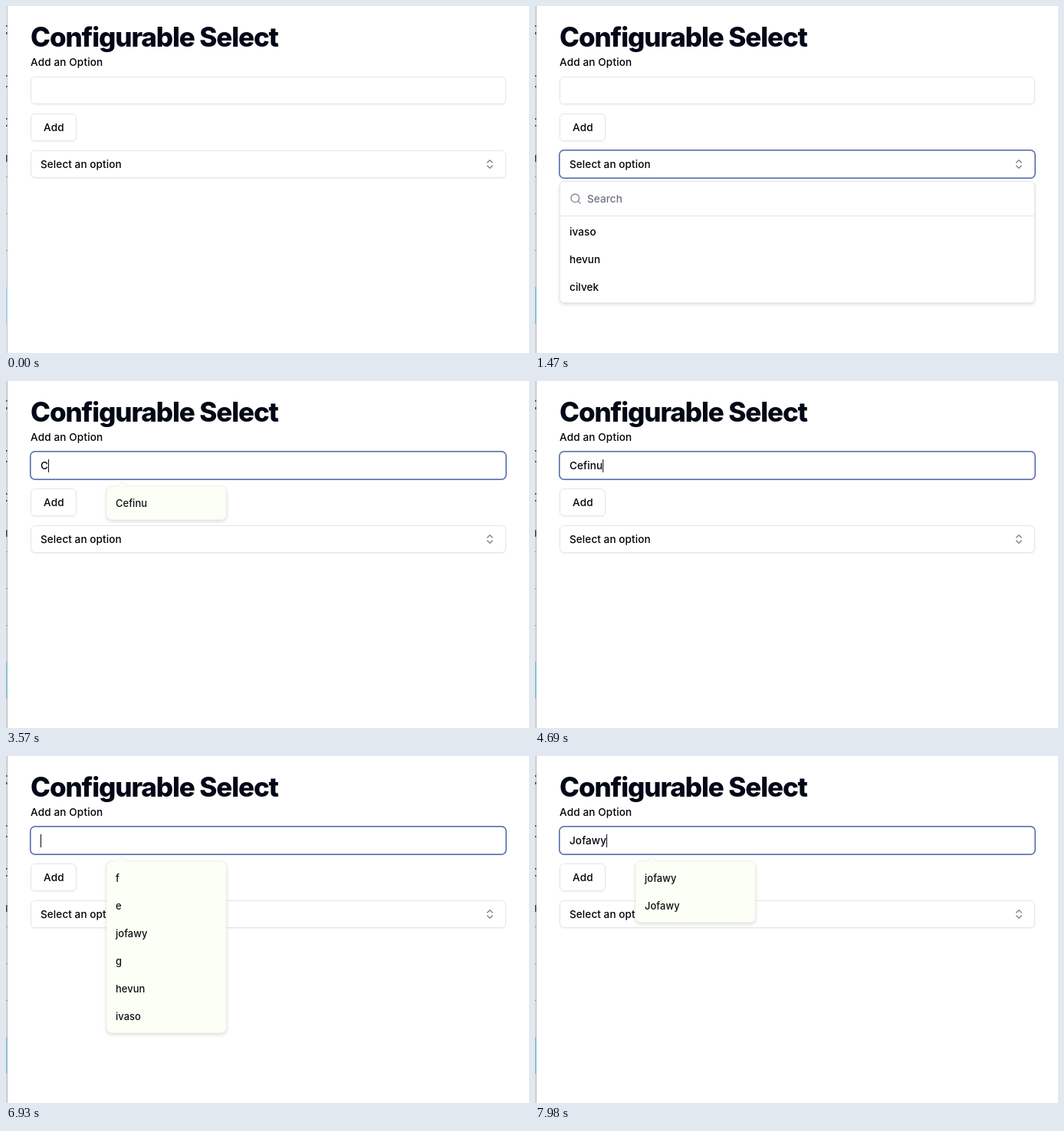
Animation of 682 by 452 pixels, one loop 8000 ms. Source, as an HTML page:

```html
<!DOCTYPE html>
<html lang="en">
<head>
<meta charset="utf-8">
<title>Configurable Select</title>
<style>
  html, body { margin: 0; width: 100%; height: 100%; overflow: hidden; background: #fff; }
  svg { display: block; width: 682px; height: 452px; }
  text { font-family: Inter, "Open Sans", sans-serif; font-size: 13.6px; font-weight: 450; letter-spacing: .05px; fill: #02040a; white-space: pre; }
  .title { font-size: 35px; font-weight: 800; letter-spacing: -1.11px; fill: #020817; }
  .medium { font-weight: 500; letter-spacing: .12px; }
  .hint { fill: #6b7280; }
  .suggest { font-size: 12.9px; font-weight: 500; fill: #0c0f14; }
  .box { fill: #fff; stroke: #e4e6ea; }
  .ring { fill: none; stroke: #536cab; stroke-width: 1.5; }
  .icon { fill: none; stroke: #7f838b; stroke-width: 2; stroke-linecap: round; stroke-linejoin: round; }
  .soft { filter: drop-shadow(0 1px 1px rgba(0, 0, 0, .06)); }
  .raised { filter: drop-shadow(0 2px 2px rgba(0, 0, 0, .13)); }
</style>
</head>
<body>
<svg viewBox="0 0 682 452">
  <rect width="682" height="452" fill="#fff"/>
  <g id="edge"></g>

  <text class="title" x="32" y="53">Configurable Select</text>
  <text class="medium" x="32" y="78">Add an Option</text>

  <rect class="box soft" x="32.5" y="92.5" width="619" height="35" rx="5.5"/>
  <rect class="box soft" x="32.5" y="140.5" width="59" height="35" rx="5.5"/>
  <text class="medium" x="49" y="163">Add</text>
  <rect class="box soft" x="32.5" y="188.5" width="619" height="35" rx="5.5"/>
  <text x="45" y="211">Select an option</text>
  <path class="icon" transform="translate(623 198) scale(.6667)" d="m7 15 5 5 5-5M7 9l5-5 5 5"/>

  <rect id="selectRing" class="ring" x="31.75" y="187.75" width="620.5" height="36.5" rx="6.2"/>
  <rect id="inputRing" class="ring" x="31.75" y="91.75" width="620.5" height="36.5" rx="6.2"/>
  <text id="typed" x="45" y="115.3"></text>
  <rect id="caret" y="102" width="1" height="17" fill="#020817"/>

  <g id="menu">
    <rect class="box raised" x="32.5" y="228.5" width="619" height="158" rx="5.5"/>
    <path d="M33 273.5H651" stroke="#e4e6ea"/>
    <path class="icon" transform="translate(45 243) scale(.6667)" d="M19 11a8 8 0 1 1-16 0a8 8 0 1 1 16 0M21 21l-4.3-4.3"/>
    <text class="hint" x="68" y="256">Search</text>
    <g id="options"></g>
  </g>

  <g id="popover">
    <g class="raised">
      <rect id="panel" x="131" y="137" width="156.5" rx="7" fill="#fcfff5" stroke="#e3e6df" stroke-width=".6"/>
    </g>
    <path d="M144.5 137.4L150.6 131.4Q152 130.2 153.4 131.4L159.5 137.4" fill="#fcfdfa" stroke="#e6e8e4" stroke-width=".6"/>
    <g id="hints"></g>
  </g>
</svg>

<script>
const LOOP = 8000, ROW = 36;
const el = id => document.getElementById(id);
const edge = el('edge'), typed = el('typed'), caret = el('caret');
const show = (id, on) => el(id).setAttribute('display', on ? 'inline' : 'none');
const bar = (x, y, w, h, fill) =>
  `<rect x="${x}" y="${y}" width="${w}" height="${h}" fill="${fill}"/>`;
const rows = (list, cls, x, y) => list.map((s, i) =>
  `<text class="${cls}" x="${x}" y="${y + i * ROW}">${s}</text>`).join('');

const recent = ['f', 'e', 'jofawy', 'g', 'hevun', 'ivaso'];
const pair = ['jofawy', 'Jofawy'];

// Each step keeps the values of the one before it.
const steps = [
  [0, { dim: false, focus: '', menu: false, text: '', caret: false, hints: [] }],
  [770, { dim: true }],
  [1330, { focus: 'select' }],
  [1470, { menu: true }],
  [2800, { focus: 'input', caret: true, hints: recent }],
  [2940, { menu: false }],
  [3290, { caret: false }],
  [3570, { text: 'C', caret: true, hints: ['Cefinu'] }],
  [3710, { text: 'Ce' }],
  [3920, { text: 'Cef' }],
  [4060, { text: 'Cefi' }],
  [4200, { text: 'Cefin' }],
  [4690, { text: 'Cefinu', hints: [] }],
  [5110, { focus: '', caret: false }],
  [5250, { text: '' }],
  [6930, { focus: 'input', caret: true, hints: recent }],
  [7350, { text: 'J', hints: [...pair, 'j', 'J'] }],
  [7490, { text: 'Jo', hints: pair }],
  [7560, { text: 'Jof' }],
  [7630, { text: 'Jofa' }],
  [7770, { text: 'Jofaw' }],
  [7980, { text: 'Jofawy' }]
];

function stateAt(t) {
  return Object.assign({}, ...steps.filter(s => s[0] <= t).map(s => s[1]));
}

// Sliver of the window behind the page.
function drawEdge(dim) {
  const [base, line, ink, blue] = dim
    ? ['#dedfe3', '#b9babd', '#4a4d55', '#8fbfd2']
    : ['#e6e7ee', '#c3c4c9', '#4a4d55', '#a6d3ea'];
  edge.innerHTML = bar(0, 0, 1, 452, base) + bar(1, 0, 1, 452, line) +
    bar(0, 366, 2, 48, blue) +
    [[25, 2], [34, 3], [90, 2], [104, 2], [146, 2], [155, 2], [194, 9]]
      .map(([y, h]) => bar(0, y, 1.6, h, ink)).join('') +
    [222, 270, 318].map(y => bar(0, y, 2, 1, '#8e9095')).join('');
}

function draw(s) {
  drawEdge(s.dim);
  show('selectRing', s.focus === 'select');
  show('inputRing', s.focus === 'input');
  show('menu', s.menu);
  typed.textContent = s.text;
  show('caret', s.caret);
  caret.setAttribute('x', 45 + (s.text ? typed.getComputedTextLength() : 0));
  show('popover', s.hints.length > 0);
  el('panel').setAttribute('height', s.hints.length * ROW + 8);
  el('hints').innerHTML = rows(s.hints, 'suggest', 143, 163.7);
}

el('options').innerHTML = rows(['ivaso', 'hevun', 'cilvek'], '', 45, 299);

const start = performance.now();
function tick() {
  draw(stateAt((performance.now() - start) % LOOP));
  requestAnimationFrame(tick);
}
tick();
</script>
</body>
</html>
```
